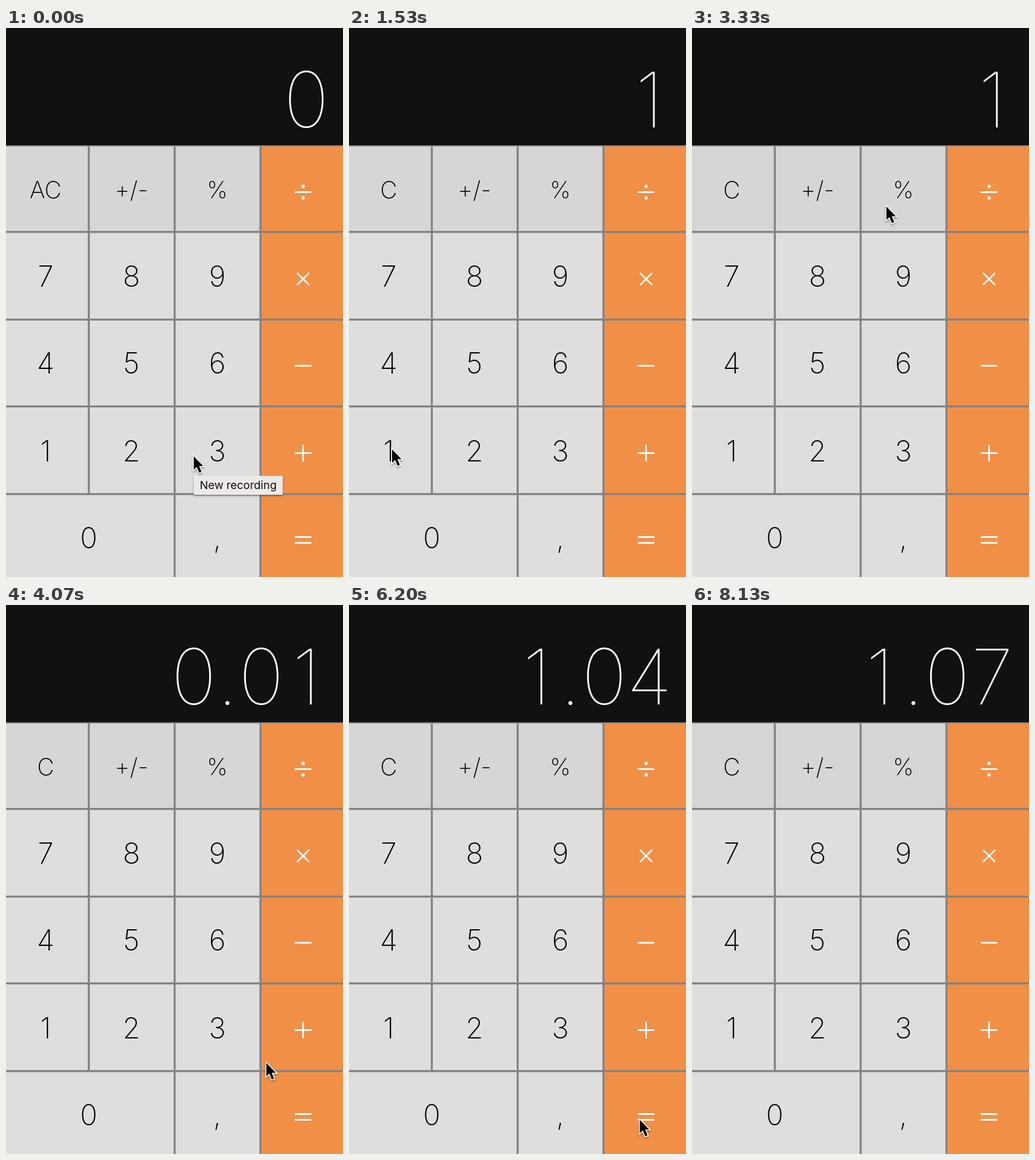
Animation, 587 px wide and 955 px high, one loop 8470 ms. Source, as an HTML page:

```html
<!DOCTYPE html>
<html lang="en">
<head>
<meta charset="utf-8">
<title>Calculator</title>
<style>
  html, body { margin: 0; width: 100%; height: 100%; overflow: hidden; background: #111; }
  svg { display: block; width: 587px; height: 955px; }
  text { font-family: Inter, Roboto, sans-serif; }
  .key { font-size: 50px; font-weight: 250; text-anchor: middle; }
  .fn { font-size: 41px; font-weight: 250; text-anchor: middle; }
  .digit { font-size: 134px; font-weight: 100; text-anchor: middle; fill: #fff; }
</style>
</head>
<body>
<svg id="stage" viewBox="0 0 587 955">
  <defs>
    <filter id="soft" x="-50%" y="-50%" width="200%" height="200%">
      <feDropShadow dx="0" dy="2" stdDeviation="1.5" flood-opacity=".4"/>
    </filter>
  </defs>
  <rect width="587" height="955" fill="#111"/>
  <rect y="204" width="587" height="751" fill="#838383"/>
  <g id="keys"></g>
  <g id="ops" stroke="#fff" stroke-width="2.8" fill="none"></g>
  <g id="display"></g>
  <g id="tip" filter="url(#soft)">
    <rect x="327" y="779" width="155" height="33" fill="#ece9e7"/>
    <text x="337.5" y="802" font-size="19.3" font-weight="400" fill="#111">New recording</text>
  </g>
  <path id="cursor" d="M0 0V23.5L5.3 18.5 9.6 28.8 13.6 27.1 9.4 17.1H16.6Z" fill="#000"
    stroke="#fff" stroke-width="3" paint-order="stroke" filter="url(#soft)"/>
</svg>
<script>
const $ = id => document.getElementById(id);
const LOOP = 8470, TICK = 200 / 3;

function add(parent, tag, attrs, text = '') {
  const el = document.createElementNS('http://www.w3.org/2000/svg', tag);
  for (const k in attrs) el.setAttribute(k, attrs[k]);
  el.textContent = text;
  return parent.appendChild(el);
}

// Keypad: column and row edges, then the labels.
const cols = [[0, 142.5], [146, 292], [295.5, 441.5], [445, 587]];
const rows = [[206, 353], [356.5, 505.5], [509, 656.5], [660, 809], [812.5, 955]];
const labels = [['AC', '+/-', '%'], ['7', '8', '9'], ['4', '5', '6'], ['1', '2', '3'], ['0', null, ',']];
const centers = [69, 218.5, 368];
const baselines = [295.5, 450, 601, 754, 905];
let clearKey;

rows.forEach(([top, bottom], r) => {
  cols.forEach(([left, right], c) => {
    if (r === 4 && c === 1) return;
    const wide = r === 4 && c === 0;
    const end = wide ? 292 : right;
    const fill = c === 3 ? '#f28f46' : r ? '#dedede' : '#d6d6d6';
    add($('keys'), 'rect', { x: left, y: top, width: end - left, height: bottom - top, fill });
    if (c === 3) return;
    const label = add($('keys'), 'text',
      { class: r ? 'key' : 'fn', x: wide ? 144 : centers[c], y: baselines[r] }, labels[r][c]);
    if (!r && !c) clearKey = label;
  });
});

const bar = y => `M503 ${y}h29`;
add($('ops'), 'path', {
  d: bar(285.5) + 'M507 426l21 21m0-21l-21 21' + bar(587.5) + bar(739.5) + 'M517.5 725v29' + bar(885.5) + bar(895.5)
});
for (const y of [275.5, 295.5]) add($('ops'), 'circle', { cx: 517.5, cy: y, r: 2.9, fill: '#fff', stroke: 'none' });

// Display slots, filled from the right.
const slots = [523, 444.5, 385.5, 327].map(x => add($('display'), 'text', { class: 'digit', x, y: 173 }));
const values = [[0, '0'], [1530, '1'], [3600, '0.01'], [4670, '1.01'], [5600, '1.02'],
  [6000, '1.03'], [6200, '1.04'], [6530, '1.05'], [6870, '1.06'], [7200, '1.07']];

// Pointer stops: time, x, y.
const stops = [[0, 327, 745], [730, 75, 733], [1800, 75, 733], [2330, 558, 737], [2600, 524, 735],
  [2670, 524, 735], [3330, 338.5, 310.5], [3470, 360, 288], [3870, 360, 288], [4070, 453.5, 797],
  [4270, 496, 938], [4600, 506.5, 895.5], [LOOP, 506.5, 895.5]];

function pointer(t) {
  const i = stops.findIndex(s => s[0] > t);
  const [t0, x0, y0] = stops[i - 1], [t1, x1, y1] = stops[i];
  const p = (t - t0) / (t1 - t0), e = p * p * (3 - 2 * p);
  return [x0 + (x1 - x0) * e, y0 + (y1 - y0) * e];
}

function draw(time) {
  const now = time % LOOP;
  const t = Math.floor((now + 5) / TICK) * TICK % LOOP;
  const value = values.filter(v => v[0] <= t + 5).pop()[1];
  const chars = [...value].reverse();
  slots.forEach((s, i) => { s.textContent = chars[i] || ''; });
  clearKey.textContent = value === '0' ? 'AC' : 'C';
  const [x, y] = pointer(t);
  $('cursor').setAttribute('transform', `translate(${x} ${y})`);
  $('cursor').style.display = t < 7195 ? '' : 'none';
  $('tip').style.display = t < 60 ? '' : 'none';
}

let start;
function frame(now) {
  start ??= now;
  draw(now - start);
  requestAnimationFrame(frame);
}
draw(0);
requestAnimationFrame(frame);
</script>
</body>
</html>
```
